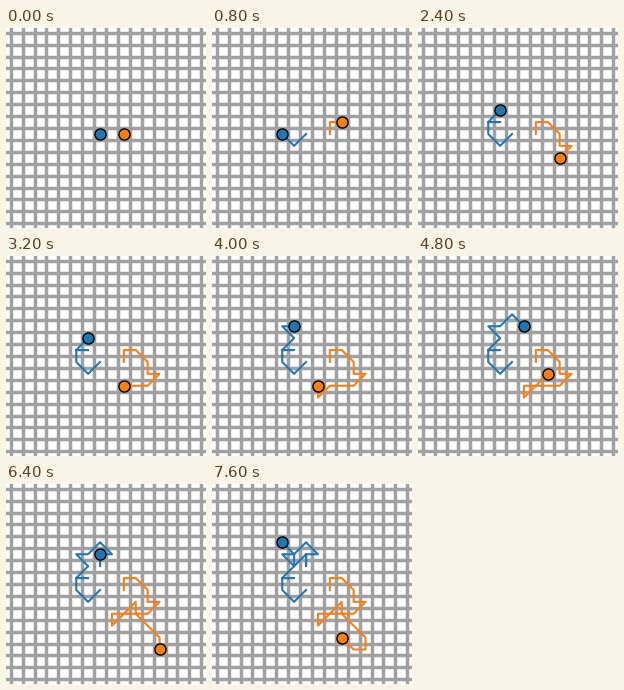
A matplotlib script for the animation above (8000 ms loop, 200 px wide and 200 px high).

```python
import matplotlib.pyplot as plt
import numpy as np
from matplotlib.animation import FuncAnimation

HALF = 8.4  # half the visible width, in grid cells
STEPS = {"N": (0, 1), "S": (0, -1), "E": (1, 0), "W": (-1, 0),
         "NE": (1, 1), "NW": (-1, 1), "SE": (1, -1), "SW": (-1, -1),
         "-": (0, 0)}


def walk(start, moves):
    """Positions of a walker that takes one compass step per frame."""
    steps = [STEPS[m] for m in moves.split()]
    return np.cumsum([start] + steps, axis=0)


walks = [
    walk((-0.5, -0.5), "SW NW N E W NE - - NW E NE SE W S N - SW N NW"),
    walk((1.5, -0.5), "N E SE S E SW W W SW N E NE S SE SE S W - NW"),
]
colors = ["tab:blue", "tab:orange"]

fig = plt.figure(figsize=(2, 2), dpi=100, facecolor="white")
ax = fig.add_axes([0, 0, 1, 1])
ax.set_xlim(-HALF, HALF)
ax.set_ylim(-HALF, HALF)
ax.axis("off")

for k in range(-8, 9):
    ax.axvline(k, color="#a0a0a0", lw=2.5, zorder=1)
    ax.axhline(k, color="#a0a0a0", lw=2.5, zorder=1)

trails = [ax.plot([], [], color=c, lw=1.5, zorder=2)[0] for c in colors]
heads = [ax.plot([], [], "o", color=c, ms=8, mec="black", mew=1, zorder=3)[0]
         for c in colors]


def update(frame):
    for path, trail, head in zip(walks, trails, heads):
        trail.set_data(path[:frame + 1, 0], path[:frame + 1, 1])
        head.set_data(path[frame:frame + 1, 0], path[frame:frame + 1, 1])
    return trails + heads


anim = FuncAnimation(fig, update, frames=len(walks[0]), interval=400,
                     repeat=True, repeat_delay=0)
plt.show()
```
